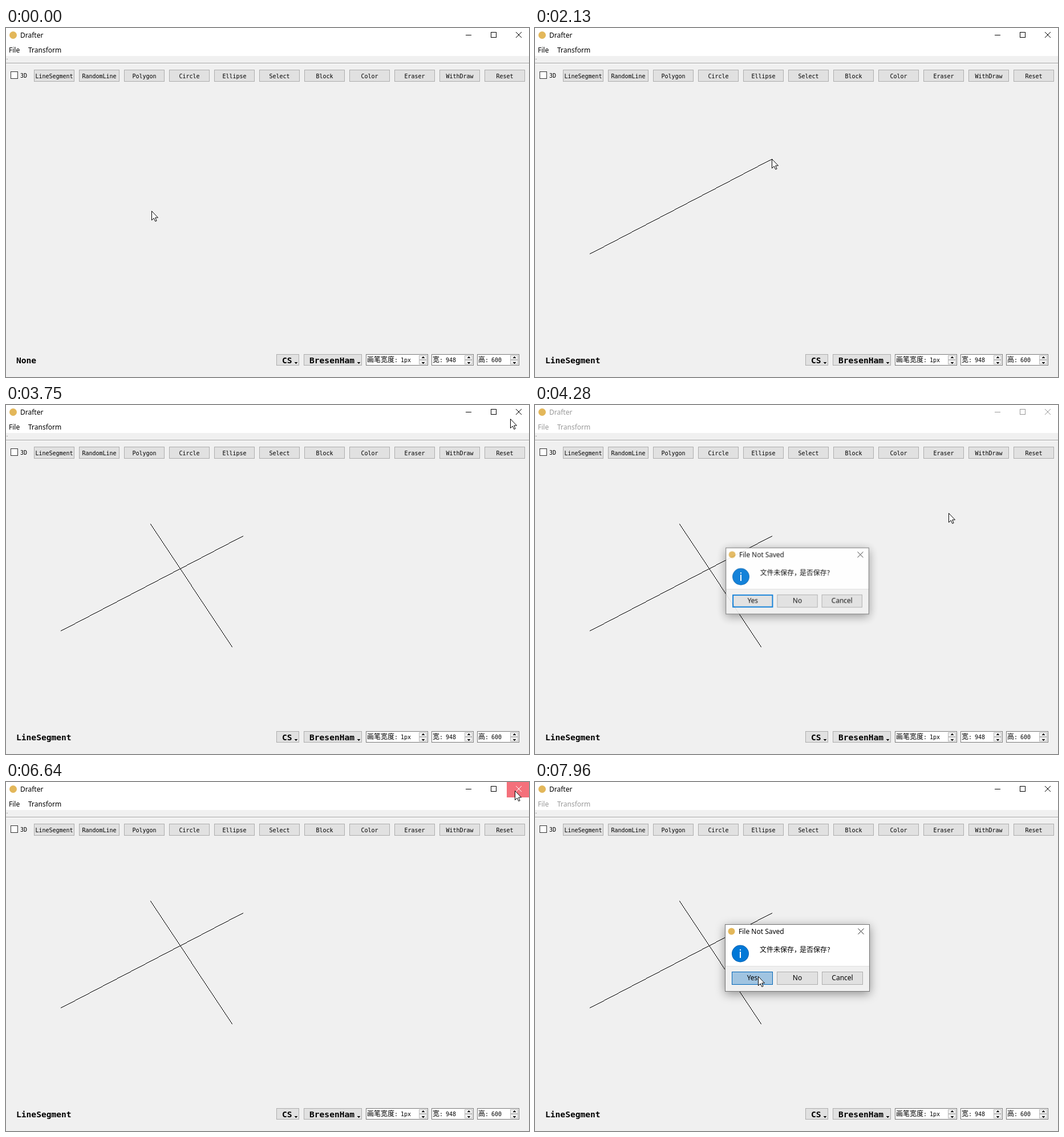
An HTML page with a canvas for the animation above (7.99 s loop, 917x611 px).

```html
<!DOCTYPE html>
<html lang="zh-CN">
<head>
<meta charset="utf-8">
<title>Drafter</title>
<style>
html, body { margin: 0; width: 100%; height: 100%; overflow: hidden; background: #f0f0f0 }
canvas { display: block }
</style>
</head>
<body>
<script>
const W = 917, H = 611, LOOP = 7990;
const UI = "12px 'Noto Sans', 'Open Sans', sans-serif";
const CJK = "12px 'Noto Sans CJK SC', 'Noto Sans CJK', sans-serif";
const MONO = "10px 'DejaVu Sans Mono', monospace";
const BOLD = "bold 14.6px 'DejaVu Sans Mono', monospace";
const TOOLS = ['LineSegment', 'RandomLine', 'Polygon', 'Circle', 'Ellipse', 'Select',
  'Block', 'Color', 'Eraser', 'WithDraw', 'Reset'];

// The pointer rests between moves; a drag leaves a line behind
const HOME = [255, 320], CLOSE = [892, 15], DRAG = true;
const MOVES = [
  [110, 720, [88, 95]],
  [1060, 1240, [86, 88]],
  [1440, 1760, [96, 395]],
  [1800, 2130, [415, 229], DRAG],
  [2230, 2450, [253, 208]],
  [2490, 2740, [396, 423], DRAG],
  [2780, 3020, [763, 171]],
  [3120, 3860, CLOSE],
  [4040, 4280, [725, 189]],
  [4280, 4660, [627, 246]],
  [4760, 5160, [580, 263]],
  [5460, 6400, CLOSE],
  [6700, 6970, [684, 190]],
  [6970, 7730, [391, 340]]
];

const newContext = () =>
  Object.assign(document.createElement('canvas'), { width: W, height: H }).getContext('2d');
const stage = newContext(), layer = newContext();
document.body.append(stage.canvas);
let ctx = stage;

const within = (v, a, b) => v >= a && v < b;
const ramp = (t, start, span) => Math.min(1, Math.max(0, (t - start) / span));
const ease = u => u * u * (3 - 2 * u);

function rect(x, y, w, h, fill) {
  ctx.fillStyle = fill;
  ctx.fillRect(x, y, w, h);
}

function box(x, y, w, h, fill, edge, thick = 1) {
  rect(x, y, w, h, edge);
  rect(x + thick, y + thick, w - 2 * thick, h - 2 * thick, fill);
}

function text(str, x, y, font, color = '#000', align = 'left') {
  ctx.font = font;
  ctx.fillStyle = color;
  ctx.textAlign = align;
  ctx.fillText(str, x, y);
}

function disc(x, y, r, fill) {
  ctx.fillStyle = fill;
  ctx.beginPath();
  ctx.arc(x, y, r, 0, 7);
  ctx.fill();
}

function cross(x, y, color) {
  ctx.strokeStyle = color;
  ctx.lineWidth = 1;
  ctx.beginPath();
  for (const d of [-5, 5]) {
    ctx.moveTo(x - d, y - 5);
    ctx.lineTo(x + d, y + 5);
  }
  ctx.stroke();
}

// Small stepped triangle; dir 1 points down, -1 up
function arrow(x, y, dir) {
  for (let i = 0; i < 3; i++) rect(x - 2 + i, y + dir * i, 5 - 2 * i, 1, '#000');
}

// v fades from idle (0) through hover (1) to pressed (2)
function button(label, x, y, w, h, font, v = 0, focus = false) {
  box(x, y, w, h, '#e1e1e1', focus ? '#0078d7' : '#adadad', focus && !v ? 2 : 1);
  ctx.globalAlpha = ramp(v, 0, 1);
  box(x, y, w, h, '#e5f1fb', '#0078d7');
  ctx.globalAlpha = ramp(v, 1, 1);
  box(x, y, w, h, '#cce4f7', '#005499');
  ctx.globalAlpha = 1;
  text(label, x + w / 2, y + 15, font, '#000', 'center');
}

function menuButton(label, x, w) {
  box(x, 571, w, 20, '#e1e1e1', '#adadad');
  text(label, x + 10, 587, BOLD);
  arrow(x + w - 6, 585, 1);
}

function spin(x, w, label, value) {
  box(x, 571, w, 20, '#fff', '#7a7a7a');
  const end = x + 2 + label.length * 12;
  text(label, x + 2, 585, CJK);
  text(':', end, 585, MONO);
  text(value, end + 11, 585, MONO);
  for (const dir of [-1, 1]) {
    box(x + w - 16, dir < 0 ? 573 : 581, 14, 8, '#f0f0f0', '#bbb');
    arrow(x + w - 9, 581 + 4 * dir, dir);
  }
}

function closeButton(x, y, w, h, hot, down, ink) {
  if (hot) rect(x, y, w, h, down ? '#f4707b' : '#e81123');
  return hot ? '#fff' : ink;
}

function segment([x0, y0], [x1, y1]) {
  const n = Math.max(Math.abs(x1 - x0), Math.abs(y1 - y0)) || 1;
  for (let i = 0; i <= n; i++)
    rect(Math.round(x0 + (x1 - x0) * i / n), Math.round(y0 + (y1 - y0) * i / n), 1, 1, '#000');
}

// Follows the moves up to t, drawing dragged lines; returns the pointer's place
function trace(t, draw) {
  let at = HOME;
  for (const [start, end, to, drag] of MOVES) {
    if (t < start) break;
    const u = ease(ramp(t, start, end - start));
    const next = at.map((a, k) => Math.round(a + (to[k] - a) * u));
    if (drag && draw) segment(at, next);
    at = next;
  }
  return at;
}

function drawWindow(t, [mx, my]) {
  const modal = within(t, 4060, 5470) || t >= 6780;
  const menuInk = modal ? '#999' : '#000', ink = t < 7900 ? menuInk : '#000';
  rect(0, 0, W, H, '#f0f0f0');
  rect(0, 0, W, 49, '#fff');
  disc(12.5, 12.5, 6.5, '#e3b75a');
  text('Drafter', 25, 17, UI, ink);
  text('File', 5, 43, UI, menuInk);
  text('Transform', 39, 43, UI, menuInk);
  rect(806, 12, 10, 1, ink);
  box(850, 7, 10, 10, '#fff', ink);
  const down = within(t, 3940, 4050) || within(t, 6600, 6740);
  cross(899, 12, closeButton(878, 0, 39, 27, mx >= 878 && my < 23, down, ink));

  rect(1, 54, 2, 1, '#a0a0a0');
  rect(0, 61, W, 1, '#a0a0a0');
  rect(0, 62, W, 1, '#fff');
  box(8, 76, 13, 13, '#fff', '#333');
  text('3D', 25, 87, MONO);
  const press = ramp(t, 1060, 220) + ramp(t, 1420, 20) - 2 * ramp(t, 1460, 260);
  TOOLS.forEach((name, i) => button(name, 49 + 79 * i, 73, 71, 21, MONO, i ? 0 : press));

  text(t < 1450 ? 'None' : 'LineSegment', 18, 587, BOLD);
  menuButton('CS', 474, 40);
  menuButton('BresenHam', 522, 102);
  spin(631, 109, '画笔宽度', '1px');
  spin(746, 74, '宽', '948');
  spin(826, 74, '高', '600');
}

function drawDialog(t, [mx, my]) {
  ctx.clearRect(0, 0, W, H);
  ctx.shadowColor = 'rgba(0,0,0,.4)';
  ctx.shadowBlur = 16;
  ctx.shadowOffsetY = 4;
  rect(333, 249, 254, 118, '#747474');
  ctx.shadowColor = 'transparent';
  rect(334, 250, 252, 72, '#fff');
  rect(334, 322, 252, 44, '#f0f0f0');
  rect(334, 322, 252, 1, '#dfdfdf');

  disc(344.5, 261.5, 6, '#e3b75a');
  text('File Not Saved', 357, 266, UI);
  const hot = within(mx, 556, 587) && within(my, 250, 274);
  cross(571.5, 261.5, closeButton(556, 250, 30, 23, hot, within(t, 5370, 5480), '#222'));

  disc(360, 300.5, 15, '#0062b1');
  disc(360, 300.5, 14, '#0078d7');
  rect(359, 293, 2, 2, '#fff');
  rect(359, 297, 2, 11, '#fff');
  text('文件未保存，', 394, 298, CJK);
  text('是否保存?', 464, 298, CJK);

  const press = ramp(t, 7560, 180) + ramp(t, 7790, 40) - ramp(t, 7890, 140);
  ['Yes', 'No', 'Cancel'].forEach((name, i) =>
    button(name, 345 + 79 * i, 332, 72, 23, UI, i ? 0 : press, !i));
}

// Shows the finished dialog as one sheet that grows and fades
function showDialog(t, mouse) {
  const open = Math.sqrt(ramp(t, 4070, 250) - ramp(t, 5450, 170) + ramp(t, 6800, 250));
  if (!open) return;
  ctx = layer;
  drawDialog(t, mouse);
  ctx = stage;
  const scale = 0.88 + 0.12 * open;
  ctx.save();
  ctx.globalAlpha = open;
  ctx.translate(460, 308);
  ctx.scale(scale, scale);
  ctx.drawImage(layer.canvas, -460, -308);
  ctx.restore();
}

function drawPointer([x, y]) {
  const shape = new Path2D('M0 0V16L3.7 12.5L6.3 18L8.6 17L6.2 11.5H11Z');
  ctx.save();
  ctx.translate(x + 0.5, y + 0.5);
  ctx.fillStyle = '#fff';
  ctx.fill(shape);
  ctx.strokeStyle = '#000';
  ctx.lineWidth = 1;
  ctx.stroke(shape);
  ctx.restore();
}

function frame() {
  const t = performance.now() % LOOP, mouse = trace(t);
  drawWindow(t, mouse);
  trace(t, true);
  showDialog(t, mouse);
  drawPointer(mouse);
  requestAnimationFrame(frame);
}
frame();
</script>
</body>
</html>
```
